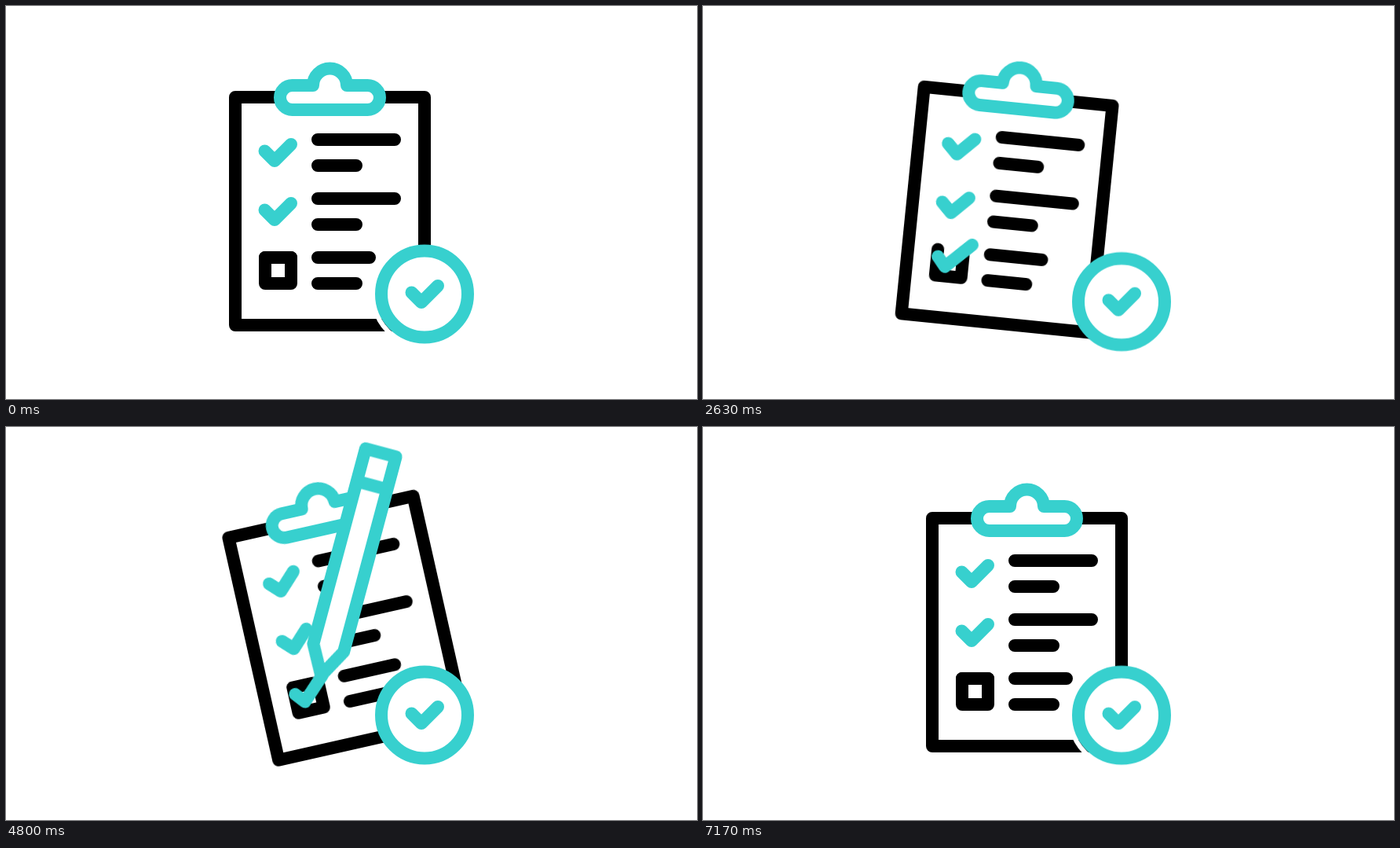
These frames come from a looping animation (880 px wide and 500 px high, 7.21 s). An HTML page:

```html
<!DOCTYPE html>
<html lang="en">
<head>
<meta charset="utf-8">
<title>Checklist</title>
<style>
html, body { margin: 0; width: 100%; height: 100%; overflow: hidden; background: #fff; }
svg { display: block; width: 880px; height: 500px; }

:root {
  --cycle: 3600ms;
  --sine: cubic-bezier(.37, 0, .63, 1);
  --cubic: cubic-bezier(.65, 0, .35, 1);
}

.ink, .teal { fill: none; stroke-width: 16; stroke-linecap: round; stroke-linejoin: round; }
.ink { stroke: #000; }
.teal { stroke: #37d0ce; }
.solid { fill: #fff; }
.gap { fill: none; stroke: #fff; stroke-width: 6; animation: gap var(--cycle) step-end infinite; }

.board { transform-origin: 412px 116px; animation: sway var(--cycle) var(--cubic) infinite; }
.badge { animation: bob calc(var(--cycle) / 3) var(--sine) infinite; }
.slide { animation: slide var(--cycle) var(--sine) infinite; }
.lift { animation: lift var(--cycle) var(--sine) infinite; }
.tick { stroke-dasharray: 1 2; animation: tick var(--cycle) var(--sine) infinite; }
.lid { stroke-dasharray: 1 2; animation: lid var(--cycle) linear infinite; }

@keyframes sway {
  0%, 88.89%, 100% { transform: translate(0, 0) rotate(0deg); }
  16.67%, 38.89% { transform: translate(-11.5px, -1.5px) rotate(-12.7deg); }
  51.39%, 69.44% { transform: translate(-11.3px, -1.2px) rotate(5.95deg); }
}
@keyframes bob {
  0%, 100% { transform: translateY(0); }
  50% { transform: translateY(30px); }
}
@keyframes slide {
  0%, 100% { transform: translateX(780px); }
  16.67% { transform: translateX(367px); }
  23.61% { transform: translateX(380px); }
  36.11%, 38.89% { transform: translateX(404px); }
  75% { transform: translateX(780px); }
}
@keyframes lift {
  0%, 100% { transform: translateY(318px) rotate(15deg); }
  16.67% { transform: translateY(340px) rotate(15deg); }
  23.61% { transform: translateY(349px) rotate(15deg); }
  36.11%, 38.89% { transform: translateY(312px) rotate(15deg); }
  49.2%, 75% { transform: translateY(300px) rotate(23.1deg); }
}
@keyframes tick {
  0%, 16.67%, 88.89%, 100% { stroke-dashoffset: 1.01; }
  23.61% { stroke-dashoffset: .74; }
  36.11%, 75% { stroke-dashoffset: 0; }
}
@keyframes lid {
  0%, 27.78%, 88.89%, 100% { stroke-dashoffset: 0; }
  52.78%, 75% { stroke-dashoffset: 1.01; }
}
@keyframes gap {
  0%, 98% { opacity: 1; }
  1% { opacity: 0; }
}
</style>
</head>
<body>
<svg viewBox="0 0 880 500">
  <defs>
    <path id="check" d="M-12.5 -12.5 L0 0 L21 -21"/>
    <clipPath id="window"><rect x="190" width="500" height="500"/></clipPath>
  </defs>

  <g class="board">
    <path class="ink" d="M292 116 H533 V406 H292 Z"/>
    <path class="ink" d="M397 170 H495 M397 203 H446 M397 245 H495 M397 278 H446 M397 320 H463 M397 353 H446"/>
    <path class="ink" d="M330 320 V353 H363 V320"/>
    <path class="ink lid" pathLength="1" d="M330 320 H363"/>
    <use class="teal" href="#check" x="342" y="197"/>
    <use class="teal" href="#check" x="342" y="272"/>
    <path class="teal tick" pathLength="1" d="M331 329 L341 341 L373 310"/>
    <path class="teal solid" d="M364.5 101 H391 A21.5 21.5 0 0 1 434 101 H460.5 A15.5 15.5 0 0 1 460.5 132 H364.5 A15.5 15.5 0 0 1 364.5 101 Z"/>
  </g>

  <g class="badge">
    <path class="gap" d="M467 367 A66 66 0 0 0 500 424"/>
    <circle class="teal solid" cx="533" cy="366.5" r="55"/>
    <use class="teal" href="#check" x="529" y="377"/>
  </g>

  <!-- The pencil's tip is its local origin. -->
  <g clip-path="url(#window)">
    <g class="slide">
      <g class="lift">
        <path class="teal solid" d="M0 0 L-20 -36.5 V-293.5 H20 V-36.5 Z M-20 -250.5 H20"/>
      </g>
    </g>
  </g>
</svg>
</body>
</html>
```
